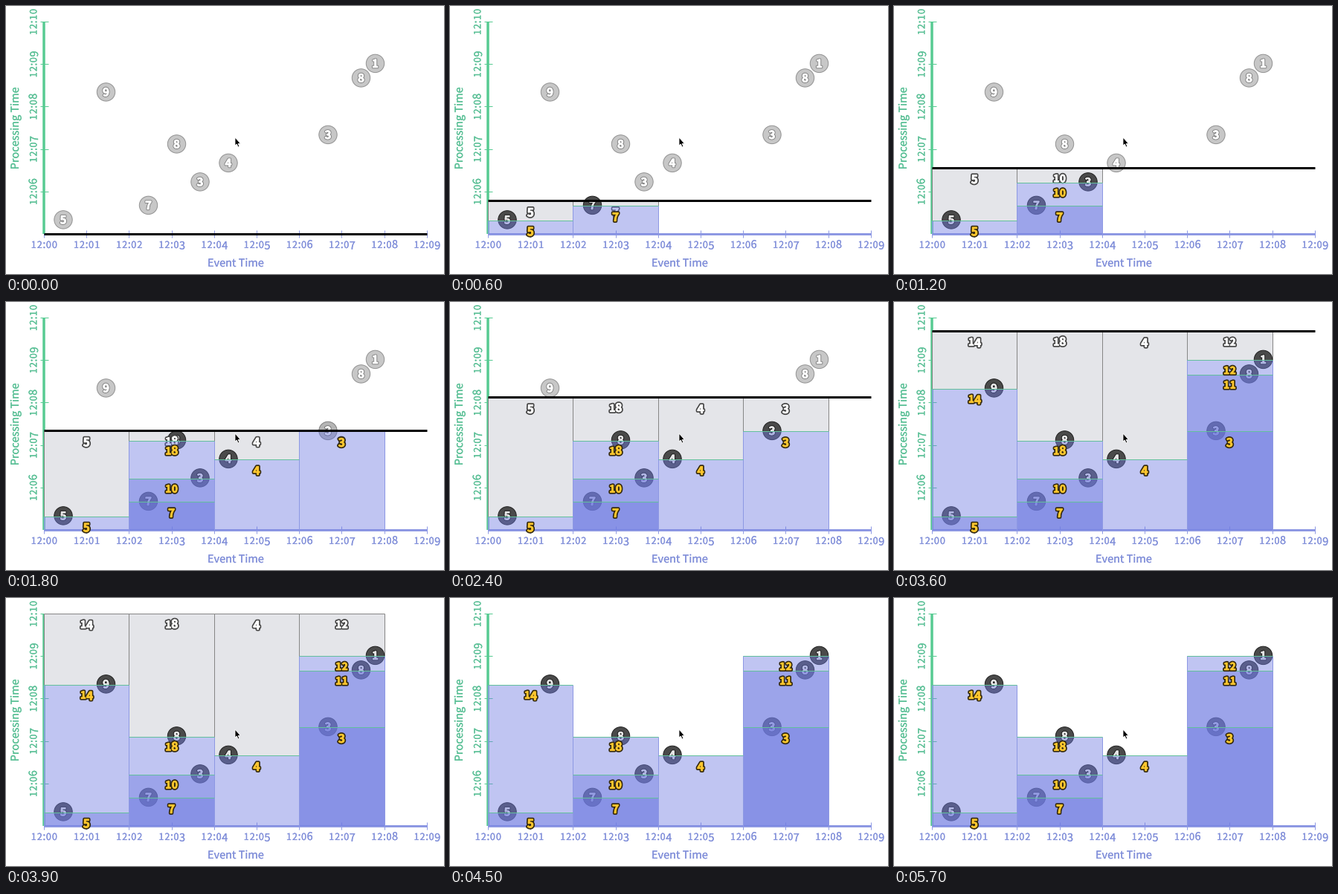
Write a matplotlib script that moves like this. It is 589 by 361 pixels and loops after 6 s.

```python
import matplotlib.pyplot as plt
from matplotlib.animation import FuncAnimation
from matplotlib.patches import Circle, Polygon, Rectangle
from matplotlib.patheffects import Normal, Stroke

W, H, DPI = 589, 361, 100
FRAMES, INTERVAL = 20, 300
LEFT, TOP, BOTTOM, STEP = 51, 21, 306.8, 57.2
RIGHT = LEFT + 9 * STEP
WINDOW = 2 * STEP
RISE = 22.3          # pixels the time line climbs per frame
CLOSE = 13           # frame on which the line reaches the top

GREEN, TEXT_GREEN = "#57cb92", "#5ac096"
BLUE, TEXT_BLUE = "#8d98e3", "#8290da"
PANEL, PANEL_ALPHA, TEAL = (0.44, 0.486, 0.886), 0.44, "#62c09c"
GREY, GREY_EDGE = "#e4e5e9", "#868686"
GOLD, GOLD_EDGE = "#ffc72e", "#33290f"

# (x, y, value) in order of arrival
EVENTS = [(77, 288.5, 5), (191.5, 269, 7), (261, 237.5, 3),
          (299, 212, 4), (229.5, 186.5, 8), (433, 174, 3),
          (134.5, 116.5, 9), (477.5, 97.5, 8), (496.5, 78, 1)]

# Stacking order
Z_OPEN, Z_EVENT, Z_TOTAL, Z_PANEL, Z_EDGE, Z_LINE, Z_RESULT = range(2, 9)

plt.rcParams["font.family"] = "Noto Sans CJK JP"
fig = plt.figure(figsize=(W / DPI, H / DPI), dpi=DPI, facecolor="white")
ax = fig.add_axes([0, 0, 1, 1])
ax.set_xlim(0, W)
ax.set_ylim(H, 0)
ax.axis("off")

live = []


def keep(artist):
    live.append(artist)
    return artist


def px(size):
    return size * 72 / DPI


def segment(x0, y0, x1, y1, color, width=1.0, z=1.0):
    return ax.plot([x0, x1], [y0, y1], color=color, lw=px(width), zorder=z,
                   solid_capstyle="butt")[0]


def glyph(x, y, s, size, color, edge=None, width=4.2, z=1.0, turn=0,
          weight="normal"):
    """One piece of text on its baseline, with an optional outline below."""
    style = dict(ha="center", va="baseline", rotation=turn,
                 rotation_mode="anchor", fontsize=px(size), weight=weight)
    made = []
    if edge is not None:
        rim = [Stroke(linewidth=px(width), foreground=edge, joinstyle="round")]
        made.append(ax.text(x, y, s, color=edge, zorder=z,
                            path_effects=rim, **style))
    swell = 0.8 if weight == "bold" else 0.2
    face = [Stroke(linewidth=px(swell), foreground=color), Normal()]
    made.append(ax.text(x, y, s, color=color, zorder=z + 0.1,
                        path_effects=face, **style))
    return made


def figures(x, y, s, size, color, turn=0, **kw):
    """Old-style numerals: 0-2 are low, 3-5, 7 and 9 hang below the line."""
    advance = [size * (0.278 if c == ":" else 0.555) for c in s]
    pos, made = -sum(advance) / 2, []
    for c, step in zip(s, advance):
        along = pos + step / 2
        drop = 0.12 * size if c in "34579" else 0
        scale = 0.87 if c in "012" else 1
        at = (x + drop, y - along) if turn else (x + along, y + drop)
        made += glyph(*at, c, size * scale, color, turn=turn, **kw)
        pos += step
    return made


def draw_stage():
    segment(LEFT, BOTTOM, RIGHT, BOTTOM, BLUE, 3, 0.6)
    segment(LEFT, TOP, LEFT, BOTTOM, GREEN, 3.5, 0.7)
    for i in range(10):
        x = LEFT + i * STEP
        segment(x, 301.5, x, 312, BLUE, 1, 0.5)
        figures(x + 0.3, 326, f"12:0{i}", 14.5, TEXT_BLUE)
    for i in range(5):
        y = TOP + i * STEP
        segment(46, y, 57, y, GREEN, 1, 0.5)
        figures(41.3, y + 0.5, f"12:{10 - i:02d}", 14.5, TEXT_GREEN, turn=90)
    glyph(309, 351, "Event Time", 14.5, TEXT_BLUE)
    glyph(17, 164.7, "Processing Time", 14.5, TEXT_GREEN, turn=90)
    arrow = [(308, 177), (308, 188), (310.4, 186), (312, 190),
             (313.8, 189.2), (312.2, 185.4), (315.3, 185.2)]
    ax.add_patch(Polygon(arrow, fc="black", ec="white", lw=px(0.8), zorder=30))


def draw_event(x, y, value, dark):
    def mix(a, b):
        return str(a + (b - a) * dark)

    y -= 0.6
    keep(ax.add_patch(Circle((x, y), 12.2, fc=mix(0.73, 0.29),
                             ec=mix(0.5, 0.13), lw=px(1),
                             alpha=0.8 + 0.2 * dark, zorder=Z_EVENT)))
    live.extend(glyph(x, y + 5.5, str(value), 15, mix(1, 0.9),
                      mix(0.52, 0.1), 2.8, Z_EVENT + 0.1, weight="bold"))


def draw_panel(x, y):
    keep(ax.add_patch(Rectangle((x, y), WINDOW, BOTTOM - y, fc=PANEL, lw=0,
                                alpha=PANEL_ALPHA, zorder=Z_PANEL)))
    for side in (x, x + WINDOW):
        keep(segment(side, y, side, BOTTOM, BLUE, 1, Z_EDGE))
    keep(segment(x, y, x + WINDOW, y, TEAL, 1, Z_EDGE + 0.1))


def draw_open(x, y, top, total):
    """Grey area still waiting below the time line, with its running total."""
    keep(ax.add_patch(Rectangle((x, y), WINDOW, top - y, fc=GREY, lw=0,
                                zorder=Z_OPEN)))
    for side in (x, x + WINDOW):
        keep(segment(side, y, side, top, GREY_EDGE, 1, Z_OPEN + 0.1))
    keep(segment(x, y, x + WINDOW, y, GREY_EDGE, 1, Z_OPEN + 0.1))
    live.extend(figures(x + STEP, y + 19.5, str(total), 15.5, "white",
                        edge="#444444", z=Z_TOTAL, weight="bold"))


def update(frame):
    while live:
        live.pop().remove()
    now = max(TOP, BOTTOM - RISE * frame)
    totals, tops = {}, {}
    for x, y, value in EVENTS:
        if now <= y:
            n = int((x - LEFT) // WINDOW)
            totals[n] = totals.get(n, 0) + value
            tops[n] = y
            start = LEFT + n * WINDOW
            draw_panel(start, y)
            live.extend(figures(start + STEP, y + 19, str(totals[n]), 15.5,
                                GOLD, edge=GOLD_EDGE, z=Z_RESULT,
                                weight="bold"))
        draw_event(x, y, value, min(1, max(0, (y - now) / 6)))
    if frame <= CLOSE:
        for n, top in tops.items():
            draw_open(LEFT + n * WINDOW, now, top, totals[n])
    if frame < CLOSE:
        keep(segment(LEFT - 0.5, now, RIGHT, now, "black", 3, Z_LINE))
    return live


draw_stage()
anim = FuncAnimation(fig, update, frames=FRAMES, interval=INTERVAL,
                     init_func=lambda: update(0), repeat=True,
                     repeat_delay=0, blit=False)
plt.show()
```
